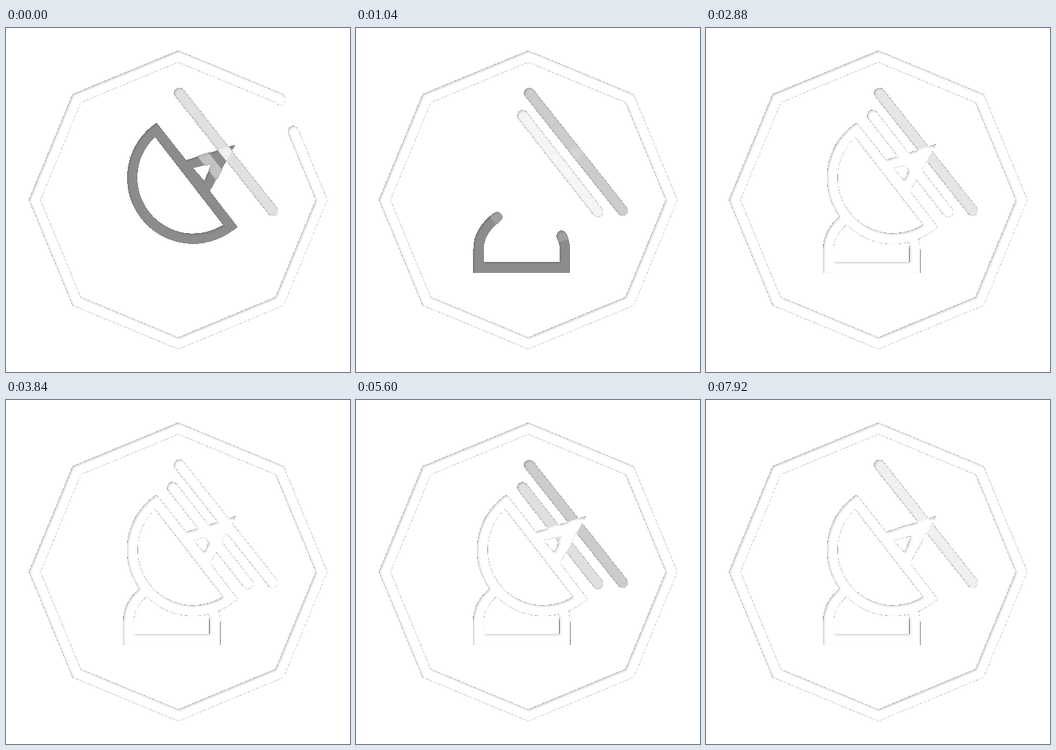
Recreate the animation shown at these times as an HTML page with a canvas. Size 500 by 500 pixels, loop 8000 ms.

```html
<!DOCTYPE html>
<html lang="en">
<head>
<meta charset="utf-8">
<title>Dish</title>
<style>
html, body { margin: 0; width: 100%; height: 100%; overflow: hidden; background: #fff; }
canvas { display: block; }
</style>
</head>
<body>
<canvas id="stage" width="500" height="500"></canvas>
<script>
const SIZE = 500, LOOP = 8000, STEP = 80;
const context = canvas => canvas.getContext('2d', { willReadFrequently: true });
const layer = () => context(Object.assign(document.createElement('canvas'), { width: SIZE, height: SIZE }));
const stage = context(document.getElementById('stage'));
const shape = layer(), soft = layer();

// Opacity of each part at the key times.
const times = [0, 1040, 1920, 3840, 5600, 6800, 7920];
const fades = {
  dish: [.55, .17, 1, 1, 1, 1, 1],
  base: [0, .55, 1, 1, 1, 1, 1],
  near: [.48, .96, 1, 1, .88, .9, .45],
  far: [.88, .8, .8, 1, .8, .87, .94]
};

function fade(part, t) {
  const i = times.findLastIndex(k => k <= t);
  const [a, b = a] = fades[part].slice(i, i + 2);
  const p = (t - times[i]) / ((times[i + 1] ?? LOOP) - times[i]);
  return a + (b - a) * (1 - Math.cos(Math.PI * p)) / 2;
}

// Half disc with the feed horn on its flat side, outlined 16 px wide.
function makeDish() {
  const path = new Path2D(), x = 272, y = 217.7, tilt = .911, half = 8, r = 88.5;
  const inset = Math.asin(half / (r - half));
  path.moveTo(219.1, 137.2);
  path.lineTo(262, 191.5);
  path.lineTo(334, 169);
  path.lineTo(297, 237);
  path.lineTo(337.5, 289.6);
  path.arc(x, y, r + half, tilt, tilt + Math.PI);
  path.closePath();
  const bowl = new Path2D();
  bowl.arc(x, y, r - half, tilt + inset, tilt + Math.PI - inset);
  bowl.closePath();
  path.addPath(bowl);
  path.addPath(new Path2D('M273 204L299 197.5L288 221Z'));
  return path;
}

// Octagon, anticlockwise from just below its upper right corner.
const RADIUS = 208.5, LENGTH = 16 * RADIUS * Math.sin(Math.PI / 8);

function makeRing() {
  const path = new Path2D();
  path.moveTo(398.4, 104.2);
  for (let i = 1; i <= 8; i++) {
    const a = -i * Math.PI / 4;
    path.lineTo(250.2 + RADIUS * Math.cos(a), 249.8 + RADIUS * Math.sin(a));
  }
  path.closePath();
  return path;
}

const ring = makeRing(), dish = makeDish();
const lines = {
  base: new Path2D('M205 275Q178 295 178 322V348H303.5V322Q303.5 311 299 302'),
  near: new Path2D('M242 127L351.5 267'),
  far: new Path2D('M252 94.5L387.5 265.5')
};

function drawShapes(t) {
  shape.clearRect(0, 0, SIZE, SIZE);
  shape.fillStyle = shape.strokeStyle = '#fff';
  shape.lineWidth = 16;
  shape.lineCap = 'round';
  shape.globalAlpha = 1;
  const gap = 50 * Math.max(0, 1 - t / 240);
  shape.setLineDash(gap ? [LENGTH - gap, LENGTH] : []);
  shape.stroke(ring);
  shape.setLineDash([]);
  for (const name in lines) {
    shape.globalAlpha = fade(name, t);
    shape.stroke(lines[name]);
  }
  shape.globalAlpha = fade('dish', t);
  shape.fill(dish, 'evenodd');
}

function draw(t) {
  drawShapes(t);

  // A shifted blur shades the edges that face up and left.
  soft.clearRect(0, 0, SIZE, SIZE);
  soft.filter = 'blur(1.5px)';
  soft.drawImage(shape.canvas, 1.4, 1.4);

  // Opacity becomes brightness; anything under half vanishes.
  const image = shape.getImageData(0, 0, SIZE, SIZE), px = image.data;
  const blur = soft.getImageData(0, 0, SIZE, SIZE).data;
  for (let i = 0; i < px.length; i += 4) {
    const a = px[i + 3];
    px[i] = px[i + 1] = px[i + 2] = a < 128 ? 255 : a - .22 * Math.max(0, a - blur[i + 3]);
    px[i + 3] = 255;
  }
  stage.putImageData(image, 0, 0);
}

let last = -1;
const start = performance.now();
function tick() {
  const t = Math.floor((performance.now() - start) % LOOP / STEP) * STEP;
  if (t !== last) draw(last = t);
  requestAnimationFrame(tick);
}
tick();
</script>
</body>
</html>
```
